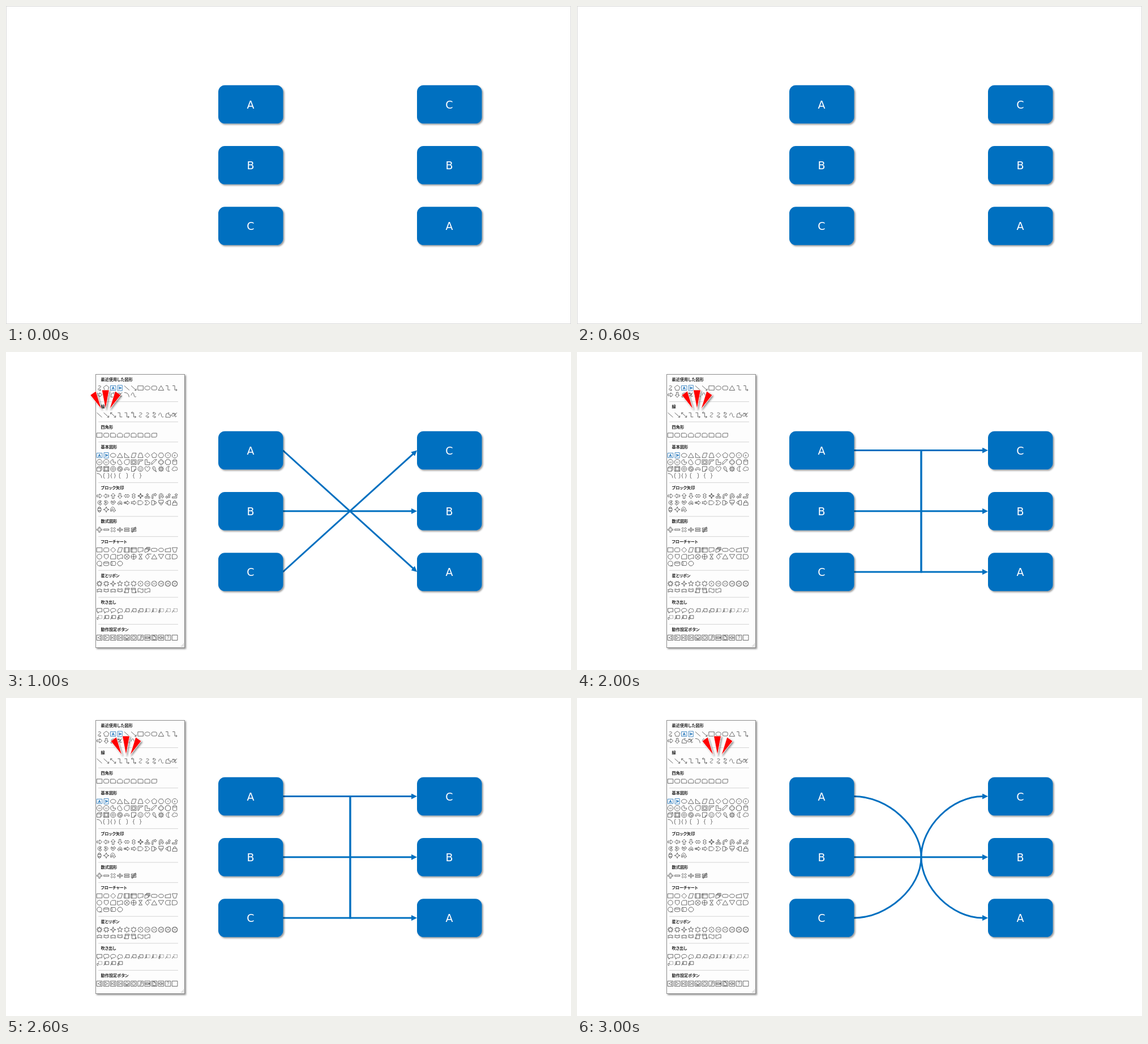
Write an HTML page that moves like this. It is 998x561 px and loops after 4 s.

```html
<!DOCTYPE html>
<html lang="ja">
<head>
<meta charset="utf-8">
<title>Connector types</title>
<style>
html, body { margin: 0; width: 100%; height: 100%; overflow: hidden; background: #fff; }
svg { display: block; width: 100%; height: 100%; }
.box { fill: #0070c0; }
.letter { font: 19px "DejaVu Sans", sans-serif; fill: #fff; text-anchor: middle; }
.link { fill: none; stroke: #0070c0; stroke-width: 3; }
.panel { fill: #fdfdfd; stroke: #8c8c8c; }
.head { font: bold 7.2px "Noto Sans CJK JP", "Noto Sans CJK", sans-serif; font-feature-settings: "palt"; fill: #222; }
.rule { stroke: #d4d4d4; }
.icon { fill: none; stroke: #484848; stroke-width: .8; stroke-linejoin: round; }
.icon text { font: 4px "DejaVu Sans", sans-serif; fill: #484848; stroke: none; text-anchor: middle; }
.icon.blue { stroke: #1a70b8; }
.icon.blue text { font-size: 6.5px; font-weight: bold; fill: #1a70b8; }
.ray { fill: #f00; stroke: #fff; stroke-width: .8; }
</style>
</head>
<body>
<svg viewBox="0 0 998 561">
  <defs>
    <filter id="shade" x="-20%" y="-20%" width="140%" height="140%">
      <feDropShadow dx="2" dy="2" stdDeviation="1.5" flood-color="#000" flood-opacity=".42"/>
    </filter>
    <marker id="tip" markerUnits="userSpaceOnUse" markerWidth="10" markerHeight="10" refX="1" refY="5" orient="auto">
      <path d="M0 0L10 5 0 10z" fill="#0070c0"/>
    </marker>
  </defs>
  <rect id="edge" x=".5" y=".5" width="997" height="560" fill="none" stroke="#d9d9d9"/>
  <g id="panel"></g>
  <g id="links"></g>
  <g id="boxes"></g>
  <g id="rays" filter="url(#shade)">
    <path class="ray" d="M-27 76L-17 69-7 101z"/>
    <path class="ray" d="M-6.5 67h13L0 101z"/>
    <path class="ray" d="M27 76L17 69 7 101z"/>
  </g>
</svg>
<script>
const $ = id => document.getElementById(id);

// Shape helpers: every icon is drawn around its own centre.
const rect = (w, h, x = -w / 2, y = -h / 2) => `M${x} ${y}h${w}v${h}h${-w}z`;
const oval = (rx, ry = rx, x = 0, y = 0) =>
  `M${x - rx} ${y}a${rx} ${ry} 0 1 0 ${2 * rx} 0a${rx} ${ry} 0 1 0 ${-2 * rx} 0z`;
const star = (n, outer, inner, turn = -90) => {
  const pts = Array.from({ length: n * 2 }, (_, i) => {
    const a = (turn + i * 180 / n) * Math.PI / 180, r = i % 2 ? inner : outer;
    return `${(r * Math.cos(a)).toFixed(2)} ${(r * Math.sin(a)).toFixed(2)}`;
  });
  return `M${pts.join('L')}z`;
};
const poly = (n, r, turn) => star(n, r, r * Math.cos(Math.PI / n), turn);

// One letter per corner, clockwise from top left: r round, s snipped, . square.
const corners = kinds => 'M' + [...kinds].map((kind, i) => {
  const sx = i === 1 || i === 2 ? 1 : -1, sy = i > 1 ? 1 : -1;
  const x = 4.5 * sx, y = 3.5 * sy;
  const side = `${x} ${y - 2.2 * sy}`, flat = `${x - 2.2 * sx} ${y}`;
  const [from, to] = i % 2 ? [flat, side] : [side, flat];
  return kind === '.' ? `${x} ${y}` : from + (kind === 'r' ? `Q${x} ${y} ` : 'L') + to;
}).join('L') + 'z';

const dashed = 'M-1.5-3.5' + 'h1m1 0'.repeat(3) + 'M-1.5 2' + 'h1m1 0'.repeat(3) +
  'M4.5-3.5' + 'v1m0 1'.repeat(3) + 'M-1.5-3.5' + 'v1m0 1'.repeat(3);
const leaders = ['M-1.5-1L-4.5 3.5', 'M-1.5 0h-1.5L-4.5 3.5', 'M-1.5 0h-2.5v3.5h2'];
const action = d => rect(9.6, 9.2) + d;

const line = 'M-4.5-4L4.5 4';
const elbow = 'M-4-4h4v7.5h4';
const curve = 'M-2-3.5c6-1.5 5 2.5 2 3.5s-4 4.5 2 3.5';
const cloud = 'M-3 2.5c-3 0-2-4 0-3.5-.5-3 3-3.5 4-2 3-1 4 1.5 3 2.5 2 2-1 4-3 2.5-1 2-3.500 1.500-4 .5z';
const ribbon = 'M-4.500 2.500l1-2-1-2h2.500v-1h4v1h2.500l-1 2 1 2h-2.500v-1h-4v1z';
const swoosh = 'M4 2l-3 2.500v-1.500c-5 0-5.500-6.500 0-6.500h2v2h-2c-2 0-2 2.500 0 2.500v-1.500z';
const callBox = 'M-4.500-4h4.500v3h1.500v-1.500l3 2.500-3 2.500v-1.500H0v3h-4.500z';

const glyphs = {
  line, elbow, curve, cloud, ribbon, swoosh, callBox,
  lineTo: line + 'M1.500 4h3v-3',
  lineBoth: line + 'M1.500 4h3v-3M-1.500-4h-3v3',
  elbowTo: elbow + 'M2 1.500l2 2-2 2',
  elbowBoth: elbow + 'M2 1.500l2 2-2 2M-2-6l-2 2 2 2',
  curveTo: curve + 'M.5 1.500l2 2-2 2',
  curveBoth: curve + 'M.5 1.500l2 2-2 2M-.5-5.500l-2 2 2 2',
  wave: 'M-4.500 1c2-6 4-6 5-1s2 4 4 3',
  free: 'M-4 4l1-6 5-2q-2 3 0 4h3l-1 4z',
  scribble: 'M-4.500-3c9-1 6 5 1 5s0-7 3-3-1 6 4 3M4-4l-5 4',
  arc: 'M-4.500-4q8 0 8.500 8',

  textBox: rect(9.500, 8) + '|A',
  sideBox: rect(9.500, 8) + '|A',
  rect: rect(9.500, 7.500),
  oval: oval(4.800, 3.500),
  round: corners('rrrr'),
  snip: corners('.s..'), snipTop: corners('ss..'), snipDiag: corners('s.s.'),
  snipMix: corners('rs..'), roundOne: corners('.r..'), roundTop: corners('rr..'), roundDiag: corners('r.r.'),

  tri: 'M0-4L4.800 4h-9.600z',
  rightTri: 'M-4-4L4.500 4h-8.500z',
  slant: 'M-2-4h6.500L2 4h-6.500z',
  trap: 'M-2-4h4L4.500 4h-9z',
  diamond: 'M0-4.500L4.500 0 0 4.500-4.500 0z',
  penta: poly(5, 4.900), hexa: poly(6, 4.800, 0),
  n7: poly(7, 4.900) + '|7', n8: poly(8, 4.900, 22.5) + '|8',
  n10: poly(10, 4.900) + '|10', n12: poly(12, 4.900, 15) + '|12',
  pie: 'M0-4.500V0h4.500A4.500 4.500 0 1 1 0-4.500z',
  chord: 'M0-4.500L4 2.500A4.500 4.500 0 1 1 0-4.500z',
  tear: 'M4.500-4.500V0A4.500 4.500 0 1 1 0-4.500z',
  frame: rect(9, 8.500) + rect(5, 4.500),
  halfFrame: 'M-4.500-4h9l-2.500 2.500h-4V2.500l-2.500 2z',
  ell: 'M-4-4.500h3.500V.5H4.500v4H-4z',
  stripe: 'M-4.500 4.500v-4l5-5h4z',
  cross: 'M-1.700-4.500h3.400v2.800h2.800v3.400H1.700v2.800h-3.400V1.700h-2.800v-3.400h2.800z',
  plaque: 'M-2.500-4.500h5q0 2 2 2v5q-2 0-2 2h-5q0-2-2-2v-5q2 0 2-2z',
  can: oval(3.500, 1.300, 0, -3.200) + 'M-3.500-3.200v6.500c0 1.700 7 1.700 7 0v-6.500',
  cube: 'M-4.500-2h6.500v6h-6.500zl2-2.200h6.800l-2.300 2.200M4.300-4.200v6L2 4',
  bevel: rect(9, 8.500) + rect(5.500, 5) + 'M-4.500-4.200l2 2M4.500-4.200l-2 2M-4.500 4.200l2-2M4.500 4.200l-2-2',
  donut: oval(4.500) + oval(2),
  no: oval(4.500) + oval(2.800) + 'M-2-2L2 2',
  blockArc: 'M-4.500 2a4.500 4.500 0 0 1 9 0h-2.500a2 2 0 0 0-4 0z',
  fold: 'M-4-4.200h8v5.500l-3 3h-5zM1 4.300V1.300h3',
  smile: oval(4.500) + oval(.4, .4, -1.500, -1.300) + oval(.4, .4, 1.500, -1.300) + 'M-2.500 1q2.500 3 5 0',
  heart: 'M0 4.500C-9-1.500-2-7 0-2.500 2-7 9-1.500 0 4.500z',
  bolt: 'M-3-3l3-1.500 2 3-1 .5 2 2.500-1 .5 2 3-5-3 1-.5-3-2 1.500-.8z',
  sun: star(8, 4.900, 3) + oval(2),
  moon: 'M2.500-4.500q-4 4.500 0 9C-5 4.500-5-4.500 2.500-4.500z',
  brackets: 'M-2.500-4.500q-2 0-2 2v5q0 2 2 2M2.500-4.500q2 0 2 2v5q0 2-2 2',
  braces: 'M-2-4.500c-2 0 0 4.500-2.500 4.500 2.500 0 .5 4.500 2.500 4.500M2-4.500c2 0 0 4.500 2.500 4.500-2.500 0-.5 4.500-2.500 4.500',
  bracket: 'M1-4.500q-2 0-2 2v5q0 2 2 2',
  brace: 'M1.500-4.500c-3 0 0 4.500-3 4.500 3 0 0 4.500 3 4.500',

  arrow: 'M-4.500-1.500H.5v-2.300L4.700 0 .5 3.800V1.500h-5z',
  twoWay: 'M-4.800 0l3-3v1.500h3.600v-1.500l3 3-3 3V1.500h-3.600V3z',
  quad: star(4, 4.900, 1.400) + 'M-1.500-3h3M-1.500 3h3M-3-1.500v3M3-1.500v3',
  triple: 'M0-4.500L2-2H.8v3.500h2V.5l2 2-2 2v-1h-5.600v1l-2-2 2-2v1h2V-2H-2z',
  bent: 'M-4 4.500v-5q0-2.700 3-2.700h2.500v-1.500l3 2.500-3 2.500v-1.500H-1q-1 0-1 1v4.700z',
  uTurn: 'M-3.500 4.500v-5c0-5 7-5 7 0v1.500h1.200L2.500 4 .3 1h1.200v-1.500c0-2.500-3-2.500-3 0v5z',
  leftUp: 'M-4.500 2l2.500-2.300v1.500H1.300V-2H0l2.300-2.500L4.500-2H3.200v5h-5.200v1.300z',
  bentUp: 'M-4.500 1.500h6V-2H0l2.500-2.500L5-2H3.500v5.800h-8z',
  striped: 'M-4.800-1.500v3M-3.500-1.500v3h1.200v-3zM-1.500-1.500H1v-2L4.700 0 1 3.500v-2h-2.500z',
  notched: 'M-4.500-1.500h5v-2.300L4.700 0 .5 3.800V1.500h-5L-3 0z',
  pentArrow: 'M-4.500-3.500H1.500L4.800 0 1.500 3.500h-6z',
  chevron: 'M-4.500-3.700h5L4.500 0 .5 3.700h-5L-1.200 0z',
  twoBox: rect(6, 4) + 'M-1-2v-1h-1.500L0-5l2.500 2H1v1M-1 2v1h-1.500L0 5l2.500-2H1V2',
  quadBox: star(4, 4.900, 2),
  circular: 'M-4.500 3c-1-10 8-9 7.500-1.500h1.500l-3 3-2.500-3h1.500c0-4-4-4-3 1.500z',

  plus: 'M-1.200-4.500h2.400v3.300h3.300v2.400H1.200v3.300h-2.400V1.200h-3.300v-2.400h3.300z',
  minus: rect(9, 2.400),
  divide: rect(9, 2) + oval(1, 1, 0, -3) + oval(1, 1, 0, 3),
  equal: rect(8.500, 2.300, -4.250, -3) + rect(8.500, 2.300, -4.250, .7),
  unequal: rect(8.500, 2.300, -4.250, -3) + rect(8.500, 2.300, -4.250, .7) + 'M-3.500 4.500L2-4.500h2l-5.500 9z',

  predef: rect(9.500, 8) + 'M-3-4v8M3-4v8',
  store: rect(9.500, 8) + 'M-3-4v8M-4.700-2h9.500',
  doc: 'M-4.500-3.800h9v6q-3-.5-4.500 1t-4.500 0z',
  docs: 'M-4.500-1.500h6v4.500q-3 0-3.500 1t-2.500 0zM-3-1.500V-3h6v4.500h-1.500M-1.500-3v-1.500h6V0H3',
  pill: 'M-2.500-2.800h5a2.800 2.800 0 0 1 0 5.600h-5a2.800 2.800 0 0 1 0-5.600z',
  prep: 'M-2.500-3h5L4.800 0 2.500 3h-5L-4.800 0z',
  input: 'M-4.700-1.500l9.400-2v7h-9.400z',
  circle: oval(4.300),
  offPage: 'M-3.700-4h7.400v5L0 4.200-3.700 1z',
  card: 'M-2-4h6.500v8h-9v-5.500z',
  tape: 'M-4.500-3q2.300 2 4.500 0t4.500 0v6.500q-2.300-2-4.500 0t-4.500 0z',
  sumX: oval(4.500) + 'M-3.200-3.200l6.400 6.400M3.200-3.200l-6.400 6.400',
  sumPlus: oval(4.500) + 'M-4.500 0h9M0-4.500v9',
  collate: 'M-3-4.200h6l-6 8.400h6z',
  sort: 'M0-4.700L3.500 0 0 4.700-3.500 0zh7',
  stored: 'M-2.500-4h7q-3 4 0 8h-7q-4-4 0-8z',
  delay: 'M-4.500-4H.5a4 4 0 0 1 0 8h-5z',
  seq: oval(4.300) + 'M0 4.300h4.700',
  disk: oval(4.500, 1.300, 0, -2) + 'M-4.500-2v4.500c0 1.700 9 1.700 9 0V-2',
  display: 'M-4.700 0l2.500-4h4q5.800 4 0 8h-4z',

  burst: star(9, 5, 2.600), burstTilt: star(8, 5, 2.600, -70),
  star4: star(4, 5, 1.500), star5: star(5, 5, 2.100), star6: star(6, 5, 2.900), star7: star(7, 5, 3),
  star8: star(8, 4.900, 3.900) + '|8', star10: star(10, 4.900, 4) + '|10',
  star12: star(12, 5, 4) + '|12', star16: star(16, 5, 4) + '|16',
  star24: star(20, 5, 4) + '|24', star32: star(24, 5, 4) + '|32',
  curl: 'M-4.700 2.500l1.200-2-1.200-2q1.200.5 2.400.5v-1.500q2.300.8 4.600 0v1.500q1.200 0 2.400-.5l-1.200 2 1.200 2q-1.200.5-2.400.5v-1q-2.300.8-4.600 0v1q-1.200 0-2.400-.5z',
  scroll: 'M-3-4h7.500v2H3v6h-7.500V2H-3zM-3-2h6M-3 2v2',
  flag: 'M-4.500-3q2.300-2 4.500 0t4.500 0v6q-2.300 2-4.500 0t-4.500 0z',

  say: 'M-4.500-4h9v6H0l-3 2.500.5-2.500h-2z',
  sayRound: 'M-3-4h6q1.500 0 1.500 1.500v3Q4.500 2 3 2H0l-3 2.500.5-2.500q-2 0-2-1.500v-3Q-4.500-4-3-4z',
  sayOval: 'M-3 4.500l.5-2.500C-8-.5-3-4 0-4c6.500 0 6 6 0 6q-1.500 0-3 2.500z',
  think: cloud + oval(.6, .6, -3, 4.200),

  back: action('M2.500-3v6l-5-3z'),
  first: action('M2.500-3v6l-4-3zM-2.700-3v6'),
  home: action('M-3.500 0L0-3.300 3.500 0h-1v3h-5V0zM-.7 3V1h1.400v2'),
  info: action(oval(3)) + '|i',
  retrace: action('M-2.500 2.500H1V-1h-1.500L1.500-3.500 3.300-1H2'),
  movie: action('M-3.500-1.700h5.500v3.500h-5.500zM2-.5l1.800-1v3l-1.800-1M-2.500 0h3'),
  page: action('M-2.500-3.500h3l2 2v5h-5zM.5-3.500v2h2'),
  sound: action('M-3.500-1h1.500l2-2v6l-2-2h-1.500zM1.500-1.500v3M3-2.200v4.400'),
  help: action('M-1.500-1.500c0-2.500 3.500-2.300 3.200 0C1.500 0 0-.5 0 1.500M0 2.500v.7'),
  blank: action('')
};
leaders.forEach((lead, i) => {
  const solid = rect(6, 5.500, -1.500, -3.500), bar = 'M-2.300-4v6.500';
  glyphs['note' + i] = solid + lead;
  glyphs['barNote' + i] = dashed + bar + lead;
  glyphs['openNote' + i] = dashed + lead;
  glyphs['fullNote' + i] = solid + bar + lead;
});

// "name/angle" turns an icon, "name!" mirrors it.
const sections = [
  ['最近使用した図形', 'curveTo penta textBox sideBox/90 line lineTo rect oval round tri elbow elbowTo',
    'arrow arrow/90 free scribble arc wave'],
  ['線', 'line lineTo lineBoth elbow elbowTo elbowBoth curve curveTo curveBoth wave free scribble'],
  ['四角形', 'rect round snip snipTop snipDiag snipMix roundOne roundTop roundDiag'],
  ['基本図形', 'textBox sideBox/90 oval tri rightTri slant trap diamond penta hexa n7 n8',
    'n10 n12 pie chord tear frame halfFrame ell stripe cross plaque can',
    'cube bevel donut no blockArc fold smile heart bolt sun moon cloud',
    'arc brackets braces bracket bracket! brace brace!'],
  ['ブロック矢印', 'arrow arrow/180 arrow/-90 arrow/90 twoWay twoWay/90 quad triple bent uTurn leftUp bentUp',
    'swoosh swoosh! swoosh/-90 swoosh/90 striped notched pentArrow chevron callBox callBox/90 callBox/180 callBox/-90',
    'twoBox quadBox circular'],
  ['数式図形', 'plus minus plus/45 divide equal unequal'],
  ['フローチャート', 'rect round diamond slant predef store doc docs pill prep input trap/180',
    'circle offPage card tape sumX sumPlus collate sort tri tri/180 stored delay',
    'seq disk can/-90 display'],
  ['星とリボン', 'burst burstTilt star4 star5 star6 star7 star8 star10 star12 star16 star24 star32',
    'ribbon ribbon/180 curl curl/180 scroll scroll! flag flag!'],
  ['吹き出し', 'say sayRound sayOval think note0 note1 note2 barNote0 barNote1 barNote2 openNote0 openNote1',
    'openNote2 fullNote0 fullNote1 fullNote2'],
  ['動作設定ボタン', 'back back! first first! home info retrace movie page sound help blank']
];

function icon(token, x, y) {
  const [, name, flip, turn] = token.match(/^(\w+)(!?)\/?(.*)$/);
  const [d, label] = glyphs[name].split('|');
  const pose = `translate(${x.toFixed(1)} ${y.toFixed(1)})` +
    (flip ? ' scale(-1 1)' : '') + (turn ? ` rotate(${turn})` : '');
  const text = label ? `<text y="${label === 'A' ? 2.4 : 1.5}">${label}</text>` : '';
  return `<g class="icon${label === 'A' ? ' blue' : ''}" transform="${pose}"><path d="${d}"/>${text}</g>`;
}

function panel() {
  let y = 48.5;
  let out = '<rect class="panel" x="158.5" y="39.5" width="157" height="482" filter="url(#shade)"/>';
  sections.forEach(([title, ...rows], i) => {
    if (i) out += `<path class="rule" d="M163 ${y - 8.5}H304"/>`;
    out += `<text class="head" x="167.5" y="${y + 2.8}">${title}</text>`;
    rows.forEach((row, r) => row.split(' ').forEach((token, c) => {
      out += icon(token, 165 + c * 12.1, y + 15 + r * 12);
    }));
    y += rows.length * 12 + 23.6;
  });
  return out + '<path d="M309 519h1m1 0h1m1 0h1M311 517h1m1 0h1M313 515h1" stroke="#999"/>';
}

const rowY = [173.5, 280.8, 388];
function column(x, letters) {
  return [...letters].map((letter, i) =>
    `<rect class="box" x="${x}" y="${rowY[i] - 33.7}" width="114.5" height="67.5" rx="11.5" filter="url(#shade)"/>` +
    `<text class="letter" x="${x + 57}" y="${rowY[i] + 7.3}">${letter}</text>`).join('');
}

const from = 489, to = 726, mid = 608, head = 9;
const routes = [
  (a, b) => {
    const k = 1 - head / Math.hypot(to - from, b - a);
    return `M${from} ${a}L${from + (to - from) * k} ${a + (b - a) * k}`;
  },
  (a, b) => `M${from} ${a}H${mid}V${b}H${to - head}`,
  (a, b) => {
    const m = (a + b) / 2;
    return `M${from} ${a}C549 ${a} ${mid} ${(a + m) / 2} ${mid} ${m}S662 ${b} ${to - head} ${b}`;
  }
];
const links = routes.map(route => rowY.map((y, i) =>
  `<path class="link" d="${i === 1 ? `M${from} ${y}H${to - head}` : route(y, rowY[2 - i])}" marker-end="url(#tip)"/>`).join(''));
const rayX = [175.8, 212, 248];

$('panel').innerHTML = panel();
$('boxes').innerHTML = column(375, 'ABC') + column(726, 'CBA');

let shown = -1;
function draw() {
  const step = Math.floor(performance.now() / 1000) % 4;
  if (step !== shown) {
    shown = step;
    const on = step > 0;
    $('edge').style.display = on ? 'none' : '';
    $('panel').style.display = $('rays').style.display = on ? '' : 'none';
    $('links').innerHTML = on ? links[step - 1] : '';
    if (on) $('rays').setAttribute('transform', `translate(${rayX[step - 1]} 0)`);
  }
  requestAnimationFrame(draw);
}
draw();
</script>
</body>
</html>
```
